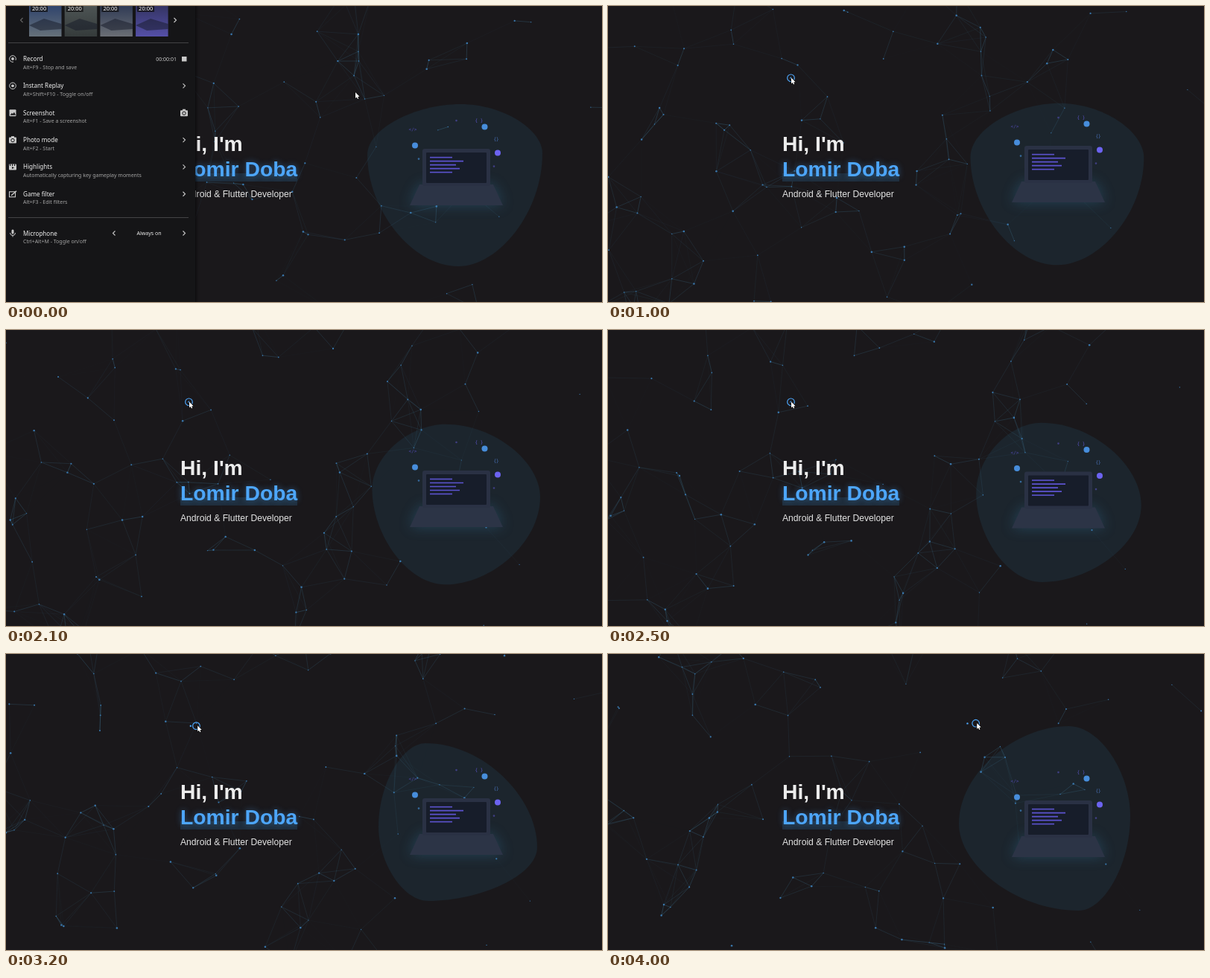
These frames come from a looping animation (800 by 398 pixels, 4.1 s). An HTML page with a canvas:

```html
<!DOCTYPE html>
<html lang="en">
<head>
<meta charset="utf-8">
<style>
html, body { margin: 0; width: 100%; height: 100%; overflow: hidden; background: #1a181b; }
canvas { display: block; }
</style>
</head>
<body>
<canvas id="stage" width="800" height="398"></canvas>
<script>
const c = document.getElementById('stage').getContext('2d');
const LOOP = 4100, STEP = 100;
const BLUE = '#4da6fa', PURPLE = '#6c63f0', GREY = '#c9c9c9', DARK = '#151517';
const SANS = '"Liberation Sans", Arial, sans-serif', UI = '"Noto Sans", sans-serif';
const MONO = '"DejaVu Sans Mono", monospace';

const lerp = (a, b, p) => a + (b - a) * p;
const mix = (p, q, k) => [lerp(p[0], q[0], k), lerp(p[1], q[1], k)];
const smooth = p => { p = Math.min(1, Math.max(0, p)); return p * p * (3 - 2 * p); };
const wrap = (v, n) => ((v % n) + n) % n;

function text(str, x, y, font, color, align = 'left') {
  c.font = font; c.fillStyle = color; c.textAlign = align;
  c.fillText(str, x, y);
}
function rect(x, y, w, h, color, r = 0) {
  c.fillStyle = color; c.beginPath(); c.roundRect(x, y, w, h, r); c.fill();
}
function dot(x, y, r, color) {
  c.fillStyle = color; c.beginPath(); c.arc(x, y, r, 0, 7); c.fill();
}
function ring(x, y, r, color, width = 1) {
  c.strokeStyle = color; c.lineWidth = width;
  c.beginPath(); c.arc(x, y, r, 0, 7); c.stroke();
}
function poly(points, color) {
  c.beginPath(); points.forEach(p => c.lineTo(...p)); c.closePath();
  c.fillStyle = color; c.fill();
}
function line(points, color, width = 1) {
  c.beginPath(); points.forEach(p => c.lineTo(...p));
  c.strokeStyle = color; c.lineWidth = width; c.stroke();
}

// Drifting network: seeded particles, linked when close
let seed = 29;
const rand = () => (seed = (seed * 16807) % 2147483647) / 2147483647;
const FIELD_W = 860, FIELD_H = 458, REACH = 80;
const particles = Array.from({ length: 100 }, () => ({
  x: rand() * FIELD_W, y: rand() * FIELD_H,
  vx: (rand() - .5) * 75, vy: (rand() - .5) * 75, r: .6 + rand() * .7
}));

function network(s) {
  const pts = particles.map(p =>
    [wrap(p.x + p.vx * s, FIELD_W) - 30, wrap(p.y + p.vy * s, FIELD_H) - 30, p.r]);
  pts.forEach(([x, y, r], i) => {
    for (const [u, v] of pts.slice(i + 1)) {
      const d = Math.hypot(x - u, y - v);
      if (d < REACH) line([[x, y], [u, v]], `rgba(70,135,170,${.5 * (1 - d / REACH)})`, .7);
    }
    dot(x, y, r, '#3a78ae');
  });
}

// Blob poses as left, top, right and bottom extremes
const poses = [
  [[485, 200], [610, 132], [720, 198], [607, 350]],
  [[500, 232], [563, 120], [713, 260], [567, 332]],
  [[471, 228], [618, 97], [701, 218], [632, 345]]
];
function blob(t) {
  const late = t > 3200, p = late ? (t - 3200) / 800 : (t / 3200) ** 2;
  const [from, to] = late ? poses.slice(1) : poses;
  const [l, tp, r, b] = from.map((point, i) => mix(point, to[i], p));
  const arc = (a, corner, z) => c.bezierCurveTo(...mix(a, corner, .52), ...mix(z, corner, .48), ...z);
  c.beginPath();
  c.moveTo(...l);
  arc(l, [l[0], tp[1]], tp);
  arc(tp, [r[0], tp[1]], r);
  arc(r, [r[0], b[1]], b);
  arc(b, [l[0], b[1]], l);
  c.fillStyle = '#1c252d';
  c.fill();
}

function laptop(t) {
  c.save();
  c.translate(0, 193.6 - 4.9 * Math.cos(2 * Math.PI * (t - 1400) / 6000));
  c.shadowColor = 'rgba(55,130,175,.32)'; c.shadowBlur = 18;
  poly([[555, 47], [654, 47], [667, 75], [542, 75]], '#2c3446');
  c.shadowBlur = 0;
  rect(559, -1, 91, 50, '#2a3144', 3);
  rect(564, 4, 81, 41, '#171d2a', 1);
  [30, 45, 35, 40, 30].forEach((w, i) => rect(569, 9.7 + 5 * i, w, 1.6, '#5c53cf'));
  dot(549, -5.5, 4, '#478ddb');
  dot(642.5, -30.5, 4, '#478ddb');
  dot(660, 4.5, 4, PURPLE);
  dot(604.5, -39, 1.3, '#3f3f83');
  dot(554, 12.5, 1.3, '#35699b');
  dot(655, 22.5, 1.3, '#3f3f83');
  text('</>', 546, -25, `6px ${MONO}`, '#5049ad', 'center');
  text('{ }', 635, -37, `6px ${MONO}`, '#5c55c8', 'center');
  text('{}', 658, -12, `6px ${MONO}`, '#4b74bd', 'center');
  c.restore();
}

function heading() {
  rect(234, 225, 157, 11, '#1f2d3b');
  text("Hi, I'm", 234, 194.5, `bold 28.3px ${SANS}`, '#ececec');
  c.shadowColor = 'rgba(74,159,240,.45)'; c.shadowBlur = 9;
  text('Lomir Doba', 234, 228.5, `bold 28.3px ${SANS}`, BLUE);
  c.shadowBlur = 0;
  text('Android & Flutter Developer', 234, 257, `12.15px ${SANS}`, '#e4e4e4');
}

function chevron(x, y, dir = 1, color = GREY) {
  line([[x - 1.5 * dir, y - 3], [x + 1.5 * dir, y], [x - 1.5 * dir, y + 3]], color, 1.1);
}
function camera(x, y) {
  rect(x - 5, y - 3.5, 10, 8, GREY, 1);
  rect(x - 2, y - 5, 4, 2, GREY);
  ring(x, y + .5, 2.2, DARK);
}
function target(y) {
  ring(9, y, 4.3, GREY);
  dot(9, y, 1.9, GREY);
}
function recordIcon(y) {
  target(y);
  rect(10, y + 2, 4, 4, DARK);
}
function pictureIcon(y) {
  rect(4.5, y - 4.5, 9, 9, GREY, 1);
  poly([[5.5, y + 3], [8, y], [9, y + 1.5], [11, y - 1], [13, y + 3]], DARK);
}
function clapperIcon(y) {
  rect(4, y - 4, 10, 8, GREY, 1);
  for (let x = 5; x < 12; x += 3) rect(x, y - 4, 1.2, 2.5, DARK);
  poly([[8, y - .5], [11, y + 1], [8, y + 2.5]], DARK);
}
function editIcon(y) {
  c.strokeStyle = GREY; c.lineWidth = 1.1;
  c.strokeRect(4.5, y - 3, 8, 7);
  line([[7, y + 2], [14, y - 4]], GREY, 1.5);
}
function micIcon(y) {
  rect(7.5, y - 5, 3, 6, GREY, 1.5);
  c.strokeStyle = GREY; c.lineWidth = 1;
  c.beginPath(); c.arc(9, y - .5, 3.5, 0, Math.PI); c.stroke();
  rect(8.5, y + 3, 1, 2, GREY);
}
const rows = [
  [recordIcon, 'Record', 'Alt+F9 - Stop and save'],
  [target, 'Instant Replay', 'Alt+Shift+F10 - Toggle on/off'],
  [pictureIcon, 'Screenshot', 'Alt+F1 - Save a screenshot'],
  [y => camera(9, y), 'Photo mode', 'Alt+F2 - Start'],
  [clapperIcon, 'Highlights', 'Automatically capturing key gameplay moments'],
  [editIcon, 'Game filter', 'Alt+F3 - Edit filters'],
  [micIcon, 'Microphone', 'Ctrl+Alt+M - Toggle on/off']
];
const thumbs = [['#30446c', '#66717a'], ['#4d5454', '#353b3b'], ['#303b55', '#6b6f75'], ['#343463', '#5550a8']];

function thumbnail([top, bottom], i) {
  const x = 31 + 47.7 * i, sky = c.createLinearGradient(0, 0, 0, 41);
  sky.addColorStop(0, top); sky.addColorStop(1, bottom);
  rect(x, 0, 43.5, 41, sky);
  poly([[x, 26], [x + 20, 17], [x + 43.5, 24], [x + 43.5, 31], [x + 15, 33]], 'rgba(20,24,38,.5)');
  rect(x + 2, 0, 23, 8, 'rgba(16,16,18,.75)');
  text('20:00', x + 4, 6.2, `7.5px ${UI}`, '#fff');
}

function panel(t) {
  const p = t / 200;
  if (p >= 1) return;
  c.save();
  c.translate(-254 * p * p, 0);
  c.shadowColor = '#000'; c.shadowBlur = 5;
  rect(-20, -10, 274, 420, DARK);
  c.shadowBlur = 0;
  thumbs.forEach(thumbnail);
  chevron(21, 19, -1, '#666');
  chevron(227, 19);
  rect(3, 49, 242, 1, '#434345');
  rect(3, 284, 242, 1, '#434345');
  rows.forEach(([icon, title, hint], i) => {
    const y = i < 6 ? 71 + 36.35 * i : 305.5;
    icon(y);
    text(title, 23, y + 3, `8.1px ${UI}`, '#f0f0f0');
    text(hint, 23, y + 13.7, `7px ${UI}`, '#a4a4a4');
    if (title === 'Record') {
      text('00:00:01', 229, y + 2.5, `7px ${UI}`, GREY, 'right');
      rect(236, y - 3, 6.5, 6.5, GREY);
    } else if (title === 'Screenshot') camera(239, y);
    else chevron(239, y);
  });
  chevron(145, 305.5, -1);
  text('Always on', 192, 308.3, `7px ${UI}`, '#ededed', 'center');
  c.restore();
}

function pointerAt(t) {
  const out = smooth((t - 307) / 593), back = smooth((t - 3070) / 1030);
  return [469 - 223 * out + 256 * back, 116 - 19.5 * out - 3.7 * back];
}
function pointer(t) {
  if (t >= 200) {
    const [rx, ry] = pointerAt(t - 8), [dx, dy] = pointerAt(t - 72);
    ring(rx - .5, ry + .3, 4.8, BLUE, 1.2);
    dot(dx - .5, dy + .3, 1.2, BLUE);
  }
  c.save();
  c.translate(...pointerAt(t));
  c.lineJoin = 'round';
  const arrow = [[0, 0], [0, 8], [1.8, 6.4], [3, 9], [4.3, 8.4], [3.2, 5.9], [5.6, 5.7], [0, 0]];
  line(arrow, '#000', 1.2);
  poly(arrow, '#fff');
  c.restore();
}

function draw(now) {
  const t = Math.floor(now % LOOP / STEP) * STEP;
  rect(0, 0, 800, 398, '#1a181b');
  blob(t);
  network(t / 1000);
  laptop(t);
  heading();
  panel(t);
  pointer(t);
}

let start;
function tick(now) {
  start ??= now;
  draw(now - start);
  requestAnimationFrame(tick);
}
draw(0);
requestAnimationFrame(tick);
</script>
</body>
</html>
```
